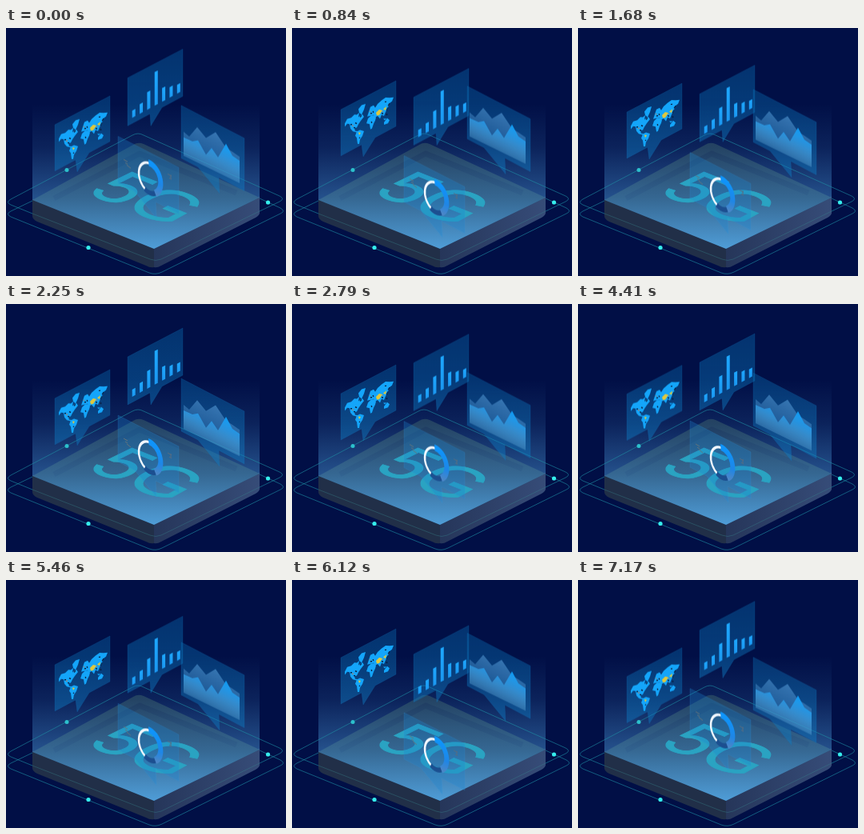
An HTML page for the animation above (7200 ms loop, 350 px wide and 310 px high).

```html
<!DOCTYPE html>
<html lang="en">
<head>
<meta charset="utf-8">
<title>5G platform</title>
<style>
  html, body { margin: 0; width: 100%; height: 100%; overflow: hidden; background: #010f46; }
  svg { display: block; width: 350px; height: 310px; }
  .float { animation: drift 1200ms linear -10ms infinite alternate; }
  .map { --rise: -27px; }
  .bars, .donut { --rise: 34.5px; }
  .area { --rise: -34.5px; }
  @keyframes drift {
    from { transform: translateY(0); }
    to { transform: translateY(var(--rise)); }
  }
  .label { font: 86px "Liberation Sans", Arial, sans-serif; text-anchor: middle; }
  .glass { fill: url(#glass); stroke: #1a70b4; stroke-opacity: .3; stroke-width: .7px; }
</style>
</head>
<body>
<svg viewBox="0 0 350 310" xmlns="http://www.w3.org/2000/svg">
  <defs>
    <linearGradient id="glow" gradientUnits="userSpaceOnUse" x1="0" y1="95" x2="0" y2="276">
      <stop offset="0" stop-color="#5ab4f5" stop-opacity="0"/>
      <stop offset=".3" stop-color="#5ab4f5" stop-opacity=".12"/>
      <stop offset=".65" stop-color="#5ab4f5" stop-opacity=".4"/>
      <stop offset="1" stop-color="#5ab4f5" stop-opacity=".82"/>
    </linearGradient>
    <linearGradient id="side">
      <stop offset="0" stop-color="#26365a"/>
      <stop offset="1" stop-color="#364c78"/>
    </linearGradient>
    <linearGradient id="glass" x1="0" y1="0" x2="0" y2="1">
      <stop offset="0" stop-color="#0a74ba" stop-opacity=".36"/>
      <stop offset="1" stop-color="#0f7cc4" stop-opacity=".46"/>
    </linearGradient>
    <linearGradient id="bar" x1="0" y1="0" x2="0" y2="1">
      <stop offset="0" stop-color="#1ea8ff"/>
      <stop offset="1" stop-color="#1b97f0"/>
    </linearGradient>
    <linearGradient id="back" x1="0" y1="0" x2="0" y2="1">
      <stop offset="0" stop-color="#3f80bc" stop-opacity=".85"/>
      <stop offset="1" stop-color="#3f80bc" stop-opacity=".2"/>
    </linearGradient>
    <linearGradient id="front" x1="0" y1="0" x2="0" y2="1">
      <stop offset="0" stop-color="#0e9ef8"/>
      <stop offset=".4" stop-color="#2b9dea" stop-opacity=".8"/>
      <stop offset="1" stop-color="#6ab4e0" stop-opacity=".25"/>
    </linearGradient>
    <linearGradient id="arc" x1="0" y1="0" x2="0" y2="1">
      <stop offset="0" stop-color="#0f94fa"/>
      <stop offset=".6" stop-color="#1f86e6"/>
      <stop offset="1" stop-color="#4a86c8"/>
    </linearGradient>
  </defs>

  <!-- Platform -->
  <path fill="#212f48" d="M33 214L185 275V299Q180 300 175 297L39 242Q33 239 33 235Z"/>
  <path fill="url(#side)" d="M185 275L317 211V231Q317 234 312 237L194 297Q189 300 185 299Z"/>
  <path fill="#1d3450" d="M33 215L159 146Q165 142 172 145L317 212L185 276Z"/>
  <path fill="none" stroke="#0c1c44" stroke-opacity=".35" stroke-width="7" stroke-linejoin="round" d="M60 213L167 157L288 206"/>
  <path fill="url(#glow)" d="M33 95H317V212L185 276L33 215Z"/>

  <!-- Orbit lines -->
  <g fill="none" stroke="#1f8fa6" stroke-opacity=".6">
    <path d="M33 232L6 221Q-1 218 6 214L158 134Q165 130 172 134L342 210Q349 213.500 342 217L317 229"/>
    <path d="M33 216L6 229Q-1 232.500 6 236L179 306Q187 309 195 305L343 232Q350 229 343 225L317 213"/>
    <path stroke="#3a8c92" stroke-opacity=".35" d="M33 232L180 289Q187 292 194 289L317 229"/>
  </g>
  <g fill="#35ecec">
    <circle cx="76" cy="177.5" r="2.5" fill="#2cc0cc"/>
    <circle cx="103" cy="274.5" r="2.6"/>
    <circle cx="327.500" cy="218" r="2.6"/>
  </g>

  <text class="label" transform="matrix(.93 .37 -.88 .48 152 227)" fill="#2aa3c2" stroke="#2aa3c2">5G</text>

  <!-- Donut panel -->
  <g class="float donut">
    <path fill="#1c86d0" fill-opacity=".3" stroke="#3a9ce0" stroke-opacity=".25" stroke-width=".7" d="M140 135L216 174V232L187 217L188 237L161 204L140 193Z"/>
    <g id="ring" transform="matrix(.75 .36 0 1 179.500 187)" fill="none"></g>
    <g fill="none">
      <path stroke="#63747c" d="M147 164l5 3M149 168l3 2M151 171l5 4"/>
      <path stroke="#566c82" d="M202 182l5 3M204 187l3 2M206 183v5"/>
    </g>
  </g>

  <!-- Bar panel -->
  <g class="float bars">
    <path class="glass" d="M152 62L221 26V85L195 99L181 122L180 107L152 122Z"/>
    <g id="bars" fill="url(#bar)"></g>
  </g>

  <!-- Map panel -->
  <g class="float map">
    <path class="glass" d="M61 121L130 85V142L104 156L89 180L87 165L61 179Z"/>
    <g transform="matrix(1 -.52 0 1 61 120)">
      <g fill="#14a5fa">
        <path d="M5 21L8 17L13 18L17 16L20 18L23 17L22 22L27 21L29 25L25 28L22 31L20 34L17 33L18 37L21 39L20 40L15 36L12 31L11 25L8 23L5 25Z"/>
        <path d="M22 12L26 9L31 10L29 16L26 21L23 17Z"/>
        <path d="M20 39L24 39L29 43L27 48L24 51L23 56L21 55L20 47L18 43Z"/>
        <path d="M34 30L38 28L42 30L44 34L43 37L41 40L39 45L37 45L36 38L32 35Z"/>
        <path d="M33 27L35 22L37 17L41 17L43 21L46 18L51 16L56 15L61 18L66 20L64 24L60 25L59 30L56 33L54 37L51 34L49 38L46 33L43 33L41 29L37 28Z"/>
        <path d="M53 40L57 42L55 43ZM54 45L58 42L61 46L59 49L54 48Z"/>
      </g>
      <path fill="#e0c83c" d="M44 28L48 26L52 29L48 33L45 32ZM53 28L57 27L56 31ZM22 41L25 43L23 45Z"/>
      <path fill="none" stroke="#0a1c3c" stroke-width="1.2" d="M12 26l2 1M18 27l2 2M16 32l2 1M24 23l2 -1M37 25l2 1M40 24l1 2M51 32l2 2M57 32l2 -3M59 27l2 -2M57 36l1 2M38 36l1 2M23 48l1 1M55 20l2 1"/>
      <path fill="none" stroke="#c87448" stroke-width=".9" d="M14 29l2 0M36 22l1 1M52 30l1 1"/>
    </g>
  </g>

  <!-- Area panel -->
  <g class="float area">
    <path class="glass" d="M219 97L298 138V204L266 187L267 207L240 174L219 163Z"/>
    <g transform="matrix(1 .49 0 1 222 111)">
      <path fill="url(#back)" d="M0 19L7 21.500L17 5L28 13L40 0L53 13L61 14L70 16V49H0Z"/>
      <path fill="url(#front)" d="M0 26L11 25.500L18 21L28 34L35 22L43 30L53 8L61 19L70 21V49H0Z"/>
    </g>
  </g>
</svg>
<script>
  const NS = 'http://www.w3.org/2000/svg';
  const add = (id, attrs) => {
    const el = document.createElementNS(NS, 'path');
    for (const key in attrs) el.setAttribute(key, attrs[key]);
    document.getElementById(id).append(el);
  };

  // Bars stand on the slanted base of their panel.
  const slope = -.54;
  [9, 12, 22, 42, 17, 13, 11].forEach((height, i) => {
    const x = 157.7 + i * 9.35, y = 112 + slope * i * 9.35;
    add('bars', { d: `M${x} ${y}v${-height}l4 ${4 * slope}v${height}Z` });
  });

  const arc = (r, from, to, stroke, width) => {
    const point = deg => {
      const a = deg * Math.PI / 180;
      return `${r * Math.cos(a)} ${r * Math.sin(a)}`;
    };
    add('ring', {
      d: `M${point(from)}A${r} ${r} 0 ${to - from > 180 ? 1 : 0} 1 ${point(to)}`,
      stroke, 'stroke-width': width
    });
  };
  arc(18, 110, 270, '#f2f8ff', 3.2);
  arc(18.5, 56, 116, '#1c4f90', 6);
  arc(18.5, -95, 60, 'url(#arc)', 8);
</script>
</body>
</html>
```
